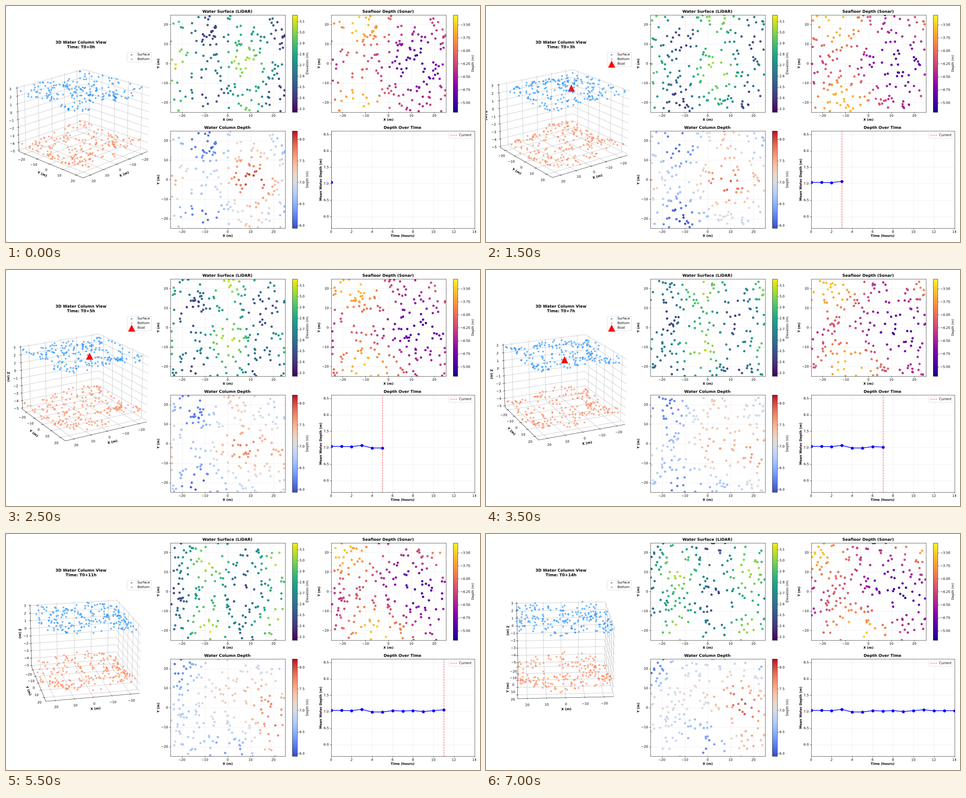
A matplotlib script for the animation above (7.5 s loop, 1058 by 529 pixels).

```python
import numpy as np
import matplotlib.pyplot as plt
from matplotlib.animation import FuncAnimation
from matplotlib.patheffects import Normal
from matplotlib.text import Text

HOURS = 15
POINTS = 200
LIM = (-25, 25)
SURF_RANGE = (2.269, 3.161)
FLOOR_RANGE = (-5.182, -3.308)
DEPTH_RANGE = (5.934, 8.197)
BOAT_HOURS = range(3, 8)
MEAN_DEPTH = [7.037, 7.036, 7.031, 7.067, 6.990, 6.988, 7.030, 7.018,
              7.032, 7.003, 7.030, 7.056, 7.025, 7.031, 7.026]

plt.rcParams["font.family"] = "DejaVu Sans"


def survey(t):
    """Scattered soundings for hour t: x, y, water surface, seafloor."""
    rng = np.random.default_rng(100 + t)
    x, y = rng.uniform(*LIM, (2, POINTS))
    surf = (2.74 + 0.22 * np.sin(0.2 * x + 0.3 * t)
            + 0.11 * np.cos(0.2 * y + 0.3 * t)
            + rng.normal(0, 0.03, POINTS))
    floor = (-4.29 - 0.45 * np.sin(0.12 * x + 0.004 * t * y)
             - 0.3 * np.cos(0.15 * y)
             + rng.normal(0, 0.05, POINTS))
    return x, y, surf, floor


def boat_at(t):
    return -2.5 + 1.95 * (t - 3), 3.7 + 2.45 * (t - 3), 3.1


fig = plt.figure(figsize=(20, 10), dpi=52.9)
fig.subplots_adjust(left=8.2 / 1058, right=1045.5 / 1058,
                    bottom=30.6 / 529, top=1 - 19.6 / 529,
                    wspace=0.122, hspace=0.191)


def map_panel(slot, title, cmap, limits, label):
    ax = fig.add_subplot(2, 3, slot)
    dots = ax.scatter([], [], c=[], s=36, cmap=cmap,
                      vmin=limits[0], vmax=limits[1])
    fig.colorbar(dots, ax=ax, label=label)
    ax.set(xlim=LIM, ylim=LIM)
    ax.set_xlabel("X (m)", fontweight="bold")
    ax.set_ylabel("Y (m)", fontweight="bold")
    ax.set_title(title, fontsize=12, fontweight="bold")
    ax.grid(alpha=0.3)
    return dots


view = fig.add_subplot(1, 3, 1, projection="3d")
surf_dots = map_panel(2, "Water Surface (LiDAR)", "viridis",
                      SURF_RANGE, "Elevation (m)")
floor_dots = map_panel(3, "Seafloor Depth (Sonar)", "plasma",
                       FLOOR_RANGE, "Depth (m)")
depth_dots = map_panel(5, "Water Column Depth", "coolwarm",
                       DEPTH_RANGE, "Depth (m)")

trend = fig.add_subplot(2, 3, 6)
trend_line, = trend.plot([], [], "bo-", lw=2, ms=8)
now_line = trend.axvline(0, color="r", ls="--", lw=1.5, alpha=0.65,
                         label="Current")
trend.set(xlim=(0, HOURS - 1),
          ylim=(DEPTH_RANGE[0] * 0.95, DEPTH_RANGE[1] * 1.05))
trend.set_xlabel("Time (hours)", fontweight="bold")
trend.set_ylabel("Mean Water Depth (m)", fontweight="bold")
trend.set_title("Depth Over Time", fontsize=12, fontweight="bold")
trend.grid(alpha=0.3)
trend.legend(loc="upper right")


def draw_view(t, x, y, surf, floor):
    view.clear()
    view.scatter(x, y, surf, c="dodgerblue", s=20, alpha=0.6, label="Surface")
    view.scatter(x, y, floor, c="coral", s=20, alpha=0.6, label="Bottom")
    if t in BOAT_HOURS:
        bx, by, bz = boat_at(t)
        view.scatter([bx], [by], [bz], c="red", s=400, marker="^",
                     label="Boat")
    for axis in (view.xaxis, view.yaxis, view.zaxis):
        axis.pane.fill = False
    view.set(xlim=LIM, ylim=LIM, zlim=(FLOOR_RANGE[0], SURF_RANGE[1]))
    view.set_xlabel("X (m)", fontweight="bold")
    view.set_ylabel("Y (m)", fontweight="bold")
    view.set_zlabel("Z (m)", fontweight="bold")
    view.set_title(f"3D Water Column View\nTime: T0+{t}h",
                   fontsize=12, fontweight="bold")
    view.legend(loc="upper right", labelspacing=0.57)
    view.view_init(elev=20, azim=45 + 3 * t)


def update(t):
    x, y, surf, floor = survey(t)
    draw_view(t, x, y, surf, floor)
    for dots, values in ((surf_dots, surf), (floor_dots, floor),
                         (depth_dots, surf - floor)):
        dots.set_offsets(np.column_stack([x, y]))
        dots.set_array(values)
    trend_line.set_data(range(t + 1), MEAN_DEPTH[:t + 1])
    now_line.set_xdata([t, t])
    # Outline text keeps sub-pixel letter spacing at this low dpi.
    for text in fig.findobj(Text):
        text.set_path_effects([Normal()])
    return []


anim = FuncAnimation(fig, update, frames=HOURS, interval=500,
                     repeat=True, blit=False)
plt.show()
```
